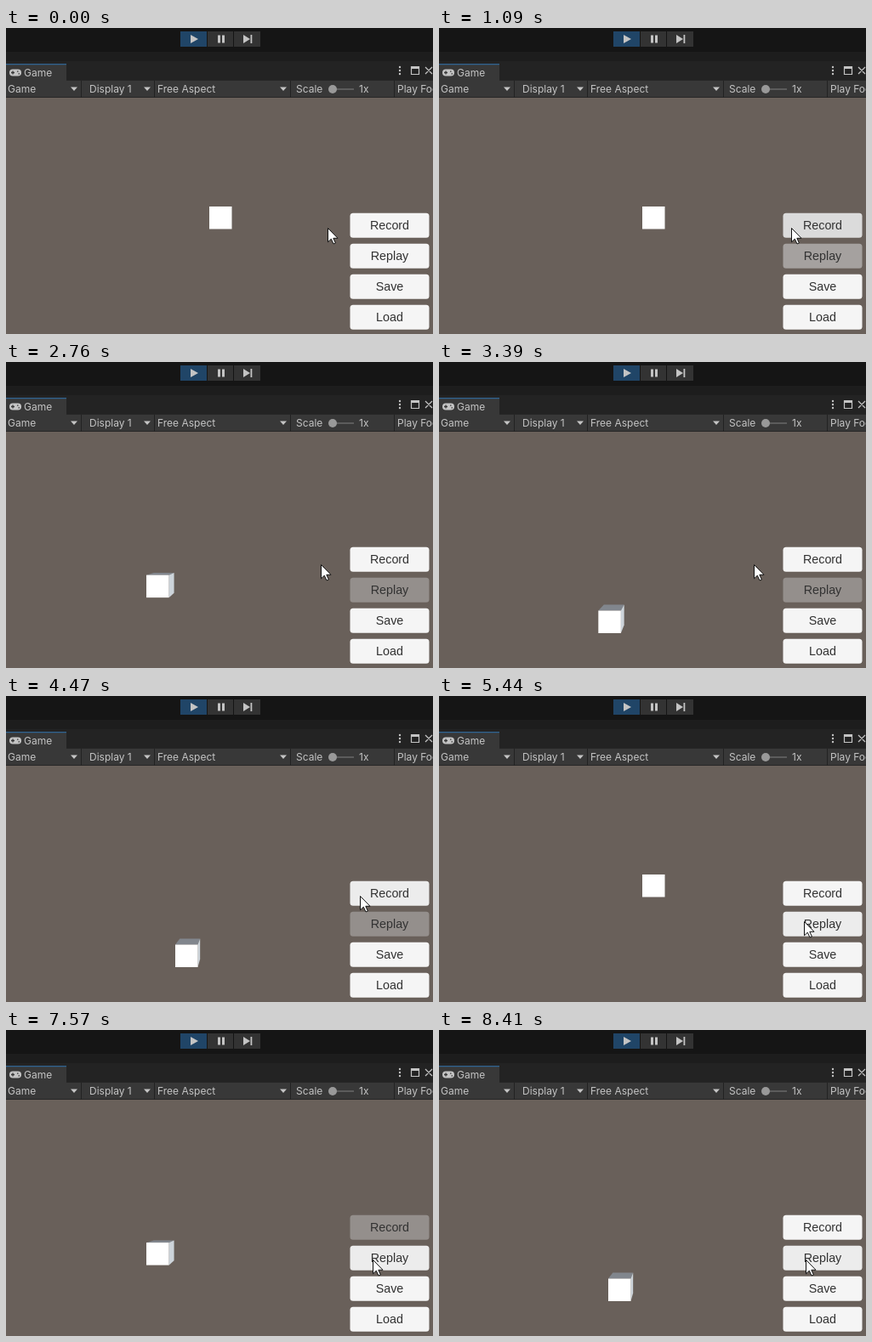
Recreate the animation shown at these times as an HTML page. Size 502 by 360 pixels, loop 9070 ms.

```html
<!DOCTYPE html>
<html lang="en">
<head>
<meta charset="utf-8">
<title>Record and replay</title>
<style>
  html, body { margin: 0; width: 100%; height: 100%; overflow: hidden; background: #69605a; }
  svg { display: block; width: 100vw; height: 100vh; }
  text { font: 12px Inter, sans-serif; fill: #c4c4c4; }
  #buttons text { font: 14.3px "Liberation Sans", Arial, sans-serif; fill: #323232; text-anchor: middle; }
</style>
</head>
<body>
<svg viewBox="0 0 502 360">
  <rect width="502" height="360" fill="#69605a"/>

  <!-- play bar -->
  <rect width="502" height="28" fill="#151515"/>
  <rect y="28" width="502" height="34" fill="#232323"/>
  <rect y="28" width="502" height="11" fill="#1d1d1d"/>
  <rect x="205" y="4" width="94" height="18" fill="#333"/>
  <rect x="205" y="4" width="31" height="18" fill="#204567"/>
  <path d="M236.5 4v18M267.5 4v18" stroke="#151515"/>
  <g fill="#c4c4c4">
    <path d="M217 8l9 5-9 5z"/>
    <path d="M249 8.5h3v9h-3zM254 8.5h3v9h-3z"/>
    <path d="M279 8l8 5-8 5zM287.500 8h1.800v10h-1.800z"/>
  </g>

  <!-- tab and view toolbar -->
  <rect y="42" width="71" height="20" fill="#383838"/>
  <rect y="42" width="71" height="1.300" fill="#2f6390"/>
  <rect y="62" width="502" height="20" fill="#383838"/>
  <path d="M0 81.500h502M71 61.500h431" stroke="#262626"/>
  <path d="M88.500 62v20M174.500 62v20M334.500 62v20M456.500 62v20" stroke="#222"/>
  <rect x="4" y="48.500" width="14" height="8" rx="4" fill="#c4c4c4"/>
  <path d="M6 52.500h4M8 50.500v4M13 51.200h1.500M14.500 53.800h1.500" stroke="#383838" stroke-width="1.300"/>
  <g fill="#c4c4c4">
    <path d="M76 69.500h8l-4 4.500zM162 69.500h8l-4 4.500zM322 69.500h8l-4 4.500z"/>
    <circle cx="463" cy="46" r="1.200"/><circle cx="463" cy="50" r="1.200"/><circle cx="463" cy="54" r="1.200"/>
    <path d="M476 45h10v3h-10z"/>
  </g>
  <path d="M476.500 45.500h9v9h-9zM493 46l8 8M501 46l-8 8" fill="none" stroke="#c4c4c4" stroke-width="1.200"/>
  <path d="M384 72h25" stroke="#686868" stroke-width="1.500"/>
  <circle cx="384" cy="72" r="5" fill="#999"/>
  <text x="21" y="57">Game</text>
  <text x="2" y="76">Game</text>
  <text x="98" y="76">Display 1</text>
  <text x="178" y="76">Free Aspect</text>
  <text x="341" y="76">Scale</text>
  <text x="415" y="76">1x</text>
  <text x="460" y="76">Play Focused</text>

  <path id="top" fill="#81868d"/>
  <path id="side" fill="#cdd4da"/>
  <rect id="front" width="26.500" height="26.500" fill="#fff"/>
  <g id="buttons"></g>
  <path id="cursor" d="M.5.5v16.300l3.800-3.600 2.700 5.800 2.400-1-2.600-5.700h5.200z" fill="#fff" stroke="#111"/>
</svg>
<script>
const LOOP = 9070, STEP = 70;
const $ = id => document.getElementById(id);

// Linear interpolation through keys of the form [time, ...values].
function track(keys, t) {
  const i = keys.findIndex(k => k[0] > t);
  if (i === 0) return keys[0].slice(1);
  if (i < 0) return keys[keys.length - 1].slice(1);
  const a = keys[i - 1], b = keys[i], u = (t - a[0]) / (b[0] - a[0]);
  return a.slice(1).map((v, n) => v + (b[n + 1] - v) * u);
}

const cubePath = [[0, 239, 210], [320, 239, 244], [1025, 165, 244], [1500, 165, 292.5], [1835, 199, 292.5]];
const RECORD_START = 1660, RECORD_STOP = 4690, REPLAY_START = 6485;

const cursorPath = [
  [320, 378, 235], [880, 414, 235], [1220, 414, 235], [1290, 402, 238], [1360, 386, 238],
  [1500, 370, 238], [4060, 370, 238], [4450, 418, 235], [4980, 418, 235], [5490, 431, 270]
];

const IDLE = 245, HOVER = 236, PRESSED = 205;
const ALWAYS = [[0, 1]], PLAIN = [[0, IDLE]];
const buttons = [
  { label: "Record",
    shade: [[560, IDLE], [640, HOVER], [950, HOVER], [1020, PRESSED], [1130, HOVER], [1290, HOVER], [1360, IDLE],
            [4260, IDLE], [4340, HOVER], [4570, HOVER], [4630, PRESSED], [4760, HOVER], [5180, HOVER], [5260, IDLE]],
    enabled: [[1000, 1], [6450, 1], [6560, 0], [8320, 0], [8400, 1]] },
  { label: "Replay",
    shade: [[5320, IDLE], [5400, HOVER], [6400, HOVER], [6450, PRESSED], [6570, HOVER]],
    enabled: [[1000, 1], [1090, 0], [4670, 0], [4760, 1]] },
  { label: "Save", shade: PLAIN, enabled: ALWAYS },
  { label: "Load", shade: PLAIN, enabled: ALWAYS }
];

$("buttons").innerHTML = buttons.map((b, i) => `
  <rect x="404.5" y="${217.7 + 36 * i}" width="93" height="29" rx="3.5"/>
  <text x="451" y="${237 + 36 * i}">${b.label}</text>`).join("");
const faces = $("buttons").querySelectorAll("rect");

function drawCube(x, y) {
  const size = 26.5, depth = 0.9, cx = 252.2, cy = 223.2;
  const backX = v => cx + (v - cx) * depth, backY = v => cy + (v - cy) * depth;
  const right = x + size, bottom = y + size;
  $("front").setAttribute("x", x);
  $("front").setAttribute("y", y);
  $("top").setAttribute("d", y > cy
    ? `M${x} ${y}L${backX(x)} ${backY(y)}H${backX(right)}L${right} ${y}z` : "");
  $("side").setAttribute("d", right < cx
    ? `M${right} ${y}L${backX(right)} ${backY(y)}V${backY(bottom)}L${right} ${bottom}z` : "");
}

function draw(time) {
  // The screen refreshes in coarse steps.
  const base = time < 6450 ? 1700 : 6450;
  const t = base + Math.floor((time - base) / STEP) * STEP;

  const start = t < RECORD_STOP ? RECORD_START : REPLAY_START;
  drawCube(...track(cubePath, t - start));

  buttons.forEach((b, i) => {
    const [on] = track(b.enabled, t), [shade] = track(b.shade, t);
    const grey = Math.round(198 + (shade - 198) * on);
    faces[i].setAttribute("fill", `rgb(${grey},${grey},${grey})`);
    faces[i].setAttribute("fill-opacity", 0.46 + 0.54 * on);
  });

  const [x, y] = track(cursorPath, t).map(Math.round);
  $("cursor").setAttribute("transform", `translate(${x} ${y})`);
}

const began = performance.now();
function frame() {
  draw((performance.now() - began) % LOOP);
  requestAnimationFrame(frame);
}
frame();
</script>
</body>
</html>
```
